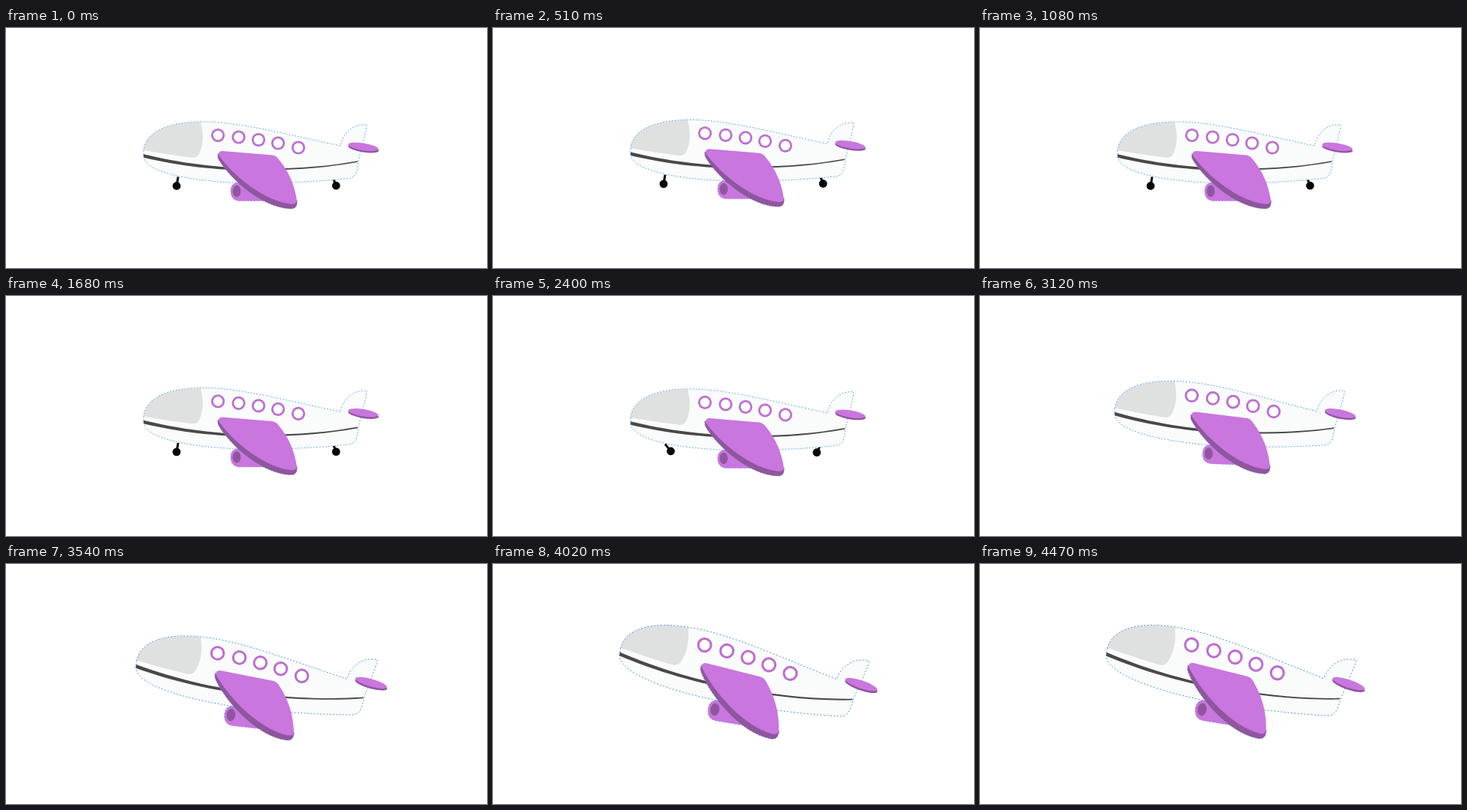
An HTML page with a canvas for the animation above (4.5 s loop, 640 by 320 pixels).

```html
<!DOCTYPE html>
<html lang="en">
<head>
<meta charset="utf-8">
<title>Plane taking off</title>
<style>
html, body { margin: 0; width: 100%; height: 100%; overflow: hidden; background: #fff; }
canvas { display: block; width: 640px; height: 320px; }
</style>
</head>
<body>
<canvas id="stage" width="640" height="320"></canvas>
<script>
const ctx = document.getElementById('stage').getContext('2d');
const LOOP = 4500;
const PURPLE = '#c976de', SHADE = '#8f569e', RING = '#bd6fd0';
const HULL = '#fafbfb', GLASS = '#dfe0e0', STRIPE = '#4a4848';

const hull = new Path2D(`M183 164 C185 140 212 125 262 125 C312 125 375 142.5 445 157
  C448 141 461 127 480 129 C479 142 471 166 469 178 C467 194 465 199.5 456 200.5
  C425 204 375 207 335 207 C270 207 183 197 183 170 Z`);
const glass = new Path2D(`M183 163 C185 140.5 212 125.5 259 125.5 C263 142 263 155 257 168
  Q254 173.5 247 172.8 Q215 169 183 163 Z`);
const stripe = new Path2D(`M183 168.3 C230 179.8 280 186.6 340 187.4 C390 187.6 430 184 468 177.2
  L468 178.8 C430 185.8 390 189.2 340 190 C280 190.3 230 183.8 183 172.8 Z`);
const wingTop = new Path2D(`M288 164 L354 169.5 Q359 170 362 174 C377 192 384 210 387 230
  Q387 235 380 234.8 C345 231.5 304 198.5 283.5 170.5 Q281 164.5 288 164 Z`);
const wingSide = new Path2D(`M282 168 Q281 173 284 177 C300 203 342 240 379 241
  Q386 241 387 235 L387.5 230 L300 175 Z`);
const engine = new Path2D(`M307 206.5 L345 206 L345 230.5 L312 230.5
  C303 231 299 225 299 218 C299 211 302 207 307 206.5 Z`);

const windows = [[282, 143], [309.5, 145.5], [336, 149], [362, 153.5], [389, 159.5]];

function ease(t, start, end) {
  const u = Math.min(1, Math.max(0, (t - start) / (end - start)));
  return (1 - Math.cos(Math.PI * u)) / 2;
}

function fill(path, color) {
  ctx.fillStyle = color;
  ctx.fill(path);
}

function ellipse(x, y, rx, ry, turn, color) {
  ctx.fillStyle = color;
  ctx.beginPath();
  ctx.ellipse(x, y, rx, ry, turn, 0, Math.PI * 2);
  ctx.fill();
}

function wheel(x, y, dx, dy, turn) {
  ctx.save();
  ctx.translate(x, y);
  ctx.rotate(turn);
  ctx.strokeStyle = '#080808';
  ctx.lineWidth = 3;
  ctx.beginPath();
  ctx.moveTo(0, 0);
  ctx.lineTo(dx, dy);
  ctx.stroke();
  ellipse(dx, dy, 5.4, 5.4, 0, '#080808');
  ctx.restore();
}

function outline(path) {
  ctx.strokeStyle = '#4a9ae0';
  ctx.lineWidth = 0.8;
  ctx.setLineDash([2, 2]);
  ctx.stroke(path);
  ctx.setLineDash([]);
}

function drawPlane(fold) {
  if (fold < 1) {
    const turn = fold * 115 * Math.PI / 180;
    wheel(229, 198.5, -2, 12, -turn);
    wheel(435.5, 200.5, 3.7, 9.7, turn);
  }
  fill(hull, HULL);
  fill(glass, GLASS);
  fill(stripe, STRIPE);
  outline(hull);

  for (const [x, y] of windows) {
    ellipse(x, y, 9.1, 9.1, 0, RING);
    ellipse(x, y, 6.3, 6.3, 0, '#fff');
  }

  outline(engine);
  fill(engine, PURPLE);
  ellipse(307, 217.5, 5.4, 7.7, 0, SHADE);
  outline(wingSide);
  fill(wingSide, SHADE);
  fill(wingTop, PURPLE);
  ellipse(475.6, 160.4, 20.5, 5.2, 0.16, SHADE);
  ellipse(475.4, 158.4, 20.2, 4.8, 0.16, PURPLE);
}

function render(t) {
  const bob = -2.7 * (1 - Math.cos(Math.PI * Math.min(t, 2700) / 540)) / 2;
  const climb = ease(t, 2640, 4140);
  const pitch = 9.75 * climb - 0.4 * ease(t, 4020, 4500);
  const size = 1 + 0.11 * climb;

  ctx.setTransform(1, 0, 0, 1, 0, 0);
  ctx.fillStyle = '#fff';
  ctx.fillRect(0, 0, 640, 320);
  ctx.translate(320, 160 + bob - 24 * climb);
  ctx.rotate(pitch * Math.PI / 180);
  ctx.scale(size, size);
  ctx.translate(-320, -160);
  drawPlane(ease(t, 2160, 2700));
}

const start = performance.now();
function frame() {
  render((performance.now() - start) % LOOP);
  requestAnimationFrame(frame);
}
frame();
</script>
</body>
</html>
```
